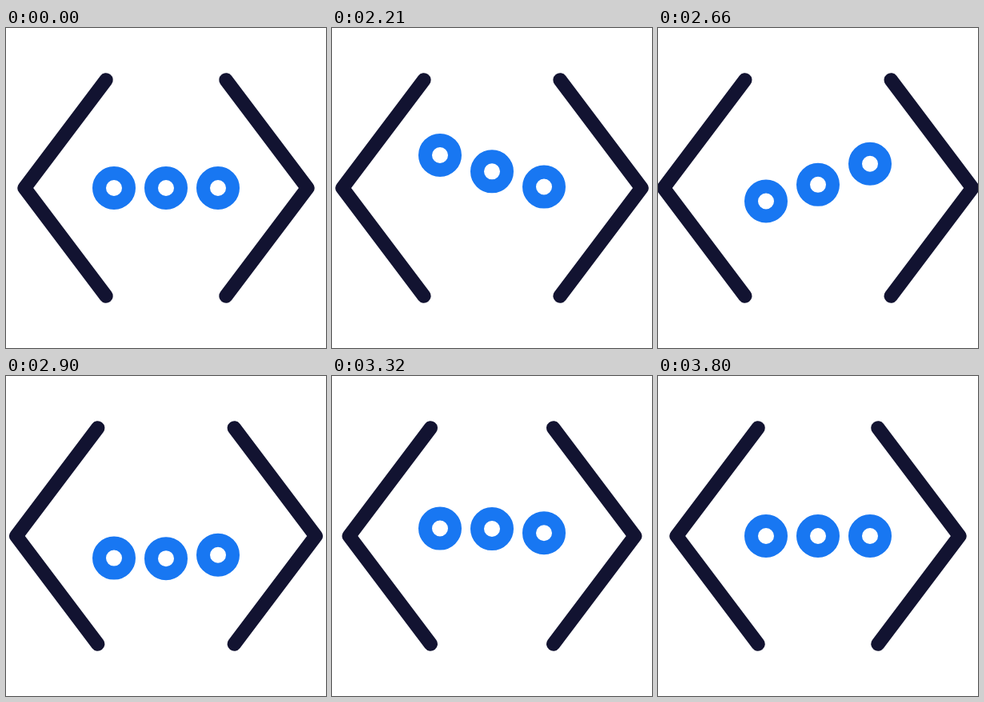
These frames come from a looping animation (400 by 400 pixels, 3.83 s). An HTML page:

```html
<!DOCTYPE html>
<html lang="en">
<head>
<meta charset="utf-8">
<title>Code brackets</title>
<style>
  html, body { margin: 0; width: 100%; height: 100%; overflow: hidden; background: #fff; }
  svg { display: block; width: 100%; height: 100%; }
  g { fill: none; }
  .brackets { stroke: #121331; stroke-width: 17.5; stroke-linecap: round; stroke-linejoin: round; }
  .dots { stroke: #1877f2; stroke-width: 17; }
</style>
</head>
<body>
<svg viewBox="0 0 400 400">
  <g class="brackets">
    <path id="left" d="M125 65 23.2 200 125 335"/>
    <path id="right" d="M275 65 376.8 200 275 335"/>
  </g>
  <g class="dots">
    <circle cx="135" cy="200" r="18.5"/>
    <circle cx="200" cy="200" r="18.5"/>
    <circle cx="265" cy="200" r="18.5"/>
  </g>
</svg>
<script>
  const LOOP = 3830, REST = 2000, STEP = 30, DOT_DELAY = 3;
  const left = document.getElementById('left');
  const right = document.getElementById('right');
  const dots = document.querySelectorAll('circle');

  // Cubic bezier easing with control points (x1, 0) and (x2, 1).
  const ease = (x1, x2) => x => {
    let lo = 0, hi = 1;
    for (let i = 0; i < 24; i++) {
      const s = (lo + hi) / 2, r = 1 - s;
      if (3 * r * r * s * x1 + 3 * r * s * s * x2 + s * s * s < x) lo = s;
      else hi = s;
    }
    return lo * lo * (3 - 2 * lo);
  };

  const soft = ease(0.333, 0.5), swing = ease(0.5, 0.4), settle = ease(0.333, 0.18);

  // Keys: [step, value, easing towards this key]
  const spread = [[0, 0], [19, 16.6, settle], [60, 0, settle]];
  const bounce = [[0, 0], [10, -47.5, soft], [28.2, 28.5, swing], [43, -9.7, swing], [54, 0, soft]];

  function valueAt(keys, n) {
    if (n <= keys[0][0]) return keys[0][1];
    for (let i = 1; i < keys.length; i++) {
      const [start, from] = keys[i - 1], [end, to, easing] = keys[i];
      if (n < end) return from + (to - from) * easing((n - start) / (end - start));
    }
    return keys[keys.length - 1][1];
  }

  function draw(now) {
    const n = Math.max(0, Math.floor((now % LOOP - REST) / STEP));
    const dx = valueAt(spread, n);
    left.setAttribute('transform', `translate(${-dx} 0)`);
    right.setAttribute('transform', `translate(${dx} 0)`);
    dots.forEach((dot, i) => dot.setAttribute('cy', 200 + valueAt(bounce, n - i * DOT_DELAY)));
  }

  const begin = performance.now();
  function tick() {
    draw(performance.now() - begin);
    requestAnimationFrame(tick);
  }
  tick();
</script>
</body>
</html>
```
